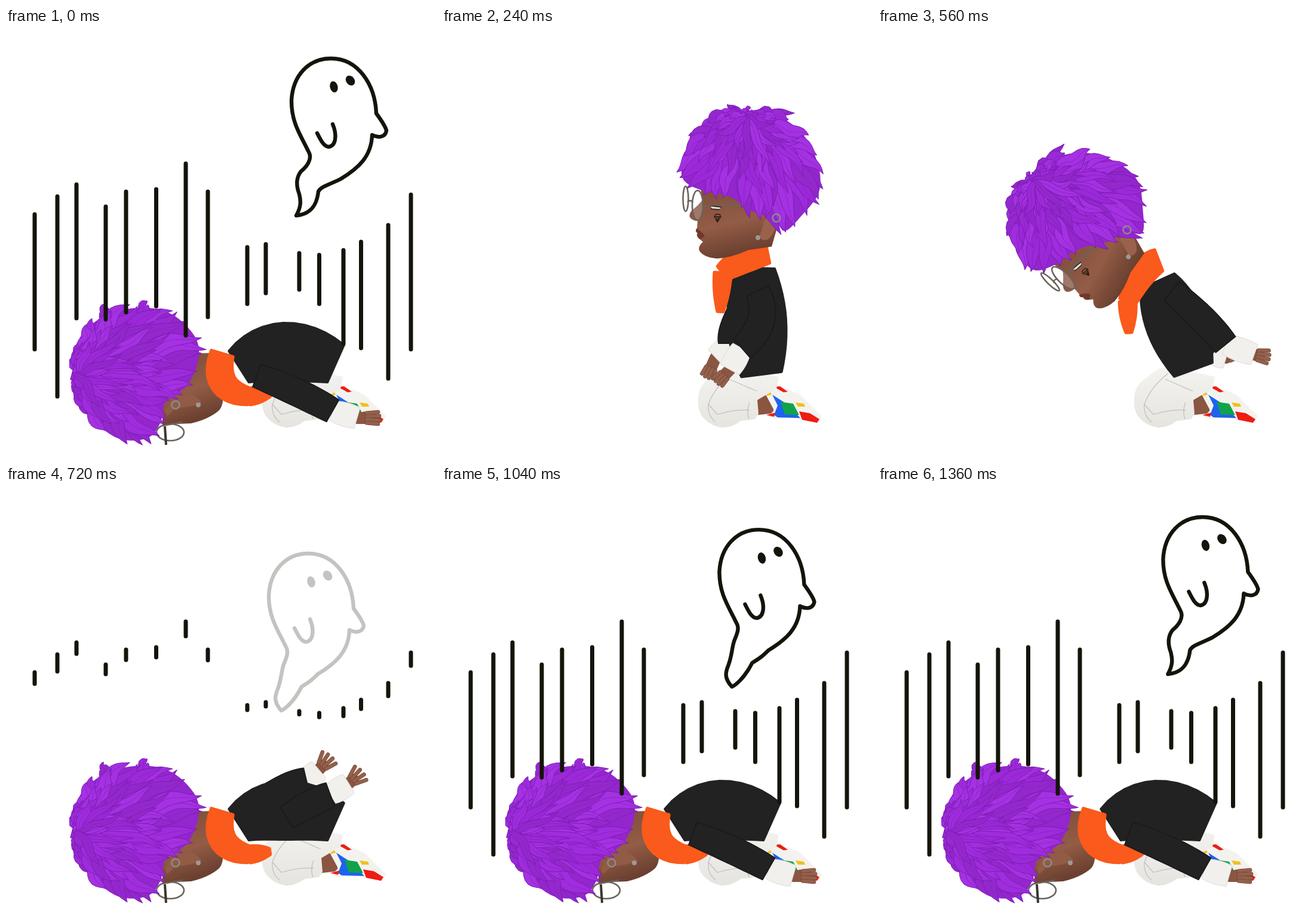
Animation, 720 px wide and 720 px high, one loop 1.44 s. Source, as an HTML page:

```html
<!DOCTYPE html>
<html lang="en">
<head>
<meta charset="utf-8">
<title>Falling to the floor</title>
<style>
html, body { margin: 0; width: 100%; height: 100%; overflow: hidden; background: #fff; }
svg { display: block; width: 100vw; height: 100vh; }
path { stroke-linejoin: round; }
.ink { fill: none; stroke: #15140a; stroke-linecap: round; }
.metal { fill: #fff3; stroke: #6a635c; stroke-width: 2.6; }
.wire { fill: none; stroke: #6a635c; stroke-width: 2.4; }
.thin { fill: none; stroke: #2b1712; stroke-width: 1.3; }
.seam { fill: none; stroke: #c3c1bb; stroke-width: 1.3; }
</style>
</head>
<body>
<svg viewBox="0 0 720 720">
  <defs>
    <linearGradient id="skin" x1="0" y1="0" x2=".3" y2="1">
      <stop offset="0" stop-color="#7c4c39"/><stop offset=".6" stop-color="#935c46"/><stop offset="1" stop-color="#6b4030"/>
    </linearGradient>
    <linearGradient id="pants" x1="0" y1="0" x2="0" y2="1">
      <stop offset="0" stop-color="#f4f3f0"/><stop offset="1" stop-color="#e6e4df"/>
    </linearGradient>
  </defs>

  <g id="legs">
    <path fill="#8a5541" d="M527 616 552 614 556 645 528 648Z"/>
    <path fill="#f3f2ef" d="M540 610 562 598 600 614 636 650 628 661 588 653 556 655 546 651 556 640Z"/>
    <path fill="#1d63ee" d="M553 614 578 630 600 653 562 652 556 648 562 632Z"/>
    <path fill="#11a34b" d="M567 626 588 629 598 648 574 647Z"/>
    <path fill="#ee1c12" d="M598 642 616 645 632 655 628 661 603 656ZM556 601 566 600 579 609 572 610ZM543 648 558 644 556 651Z"/>
    <path fill="#f2c018" d="M592 627 606 629 608 634 596 634ZM543 612 550 610 552 614 544 616Z"/>
    <path fill="url(#pants)" d="M430 612Q434 594 452 584 470 566 490 567L564 584 560 604 528 623 530 646 524 655 500 658Q484 670 468 669 446 665 434 648 426 634 430 612Z"/>
    <path class="seam" d="M486 578Q456 602 446 630L461 647Q492 638 515 640M481 588 527 608M446 630Q444 648 458 660M515 627Q509 642 514 655"/>
  </g>
  <g id="backArm"></g>
  <path id="torso" fill="#222" stroke="#222" stroke-width="4"/>
  <g id="lyingHead"></g>
  <path id="scarf" fill="#fa5a1b" stroke="#fa5a1b" stroke-width="5"/>
  <g id="sideHead"></g>
  <g id="frontArm"></g>
  <path id="bars" class="ink" stroke-width="7"/>
  <g id="ghost" class="ink" stroke-width="6.4">
    <path id="sheet"/>
    <path d="M521 176C527 188 532 198 540 199 552 198 555 180 547 161"/>
    <g fill="#15140a" stroke="none">
      <ellipse rx="6.500" ry="9.500" transform="translate(549 98.500) rotate(-15)"/>
      <ellipse rx="7" ry="9" transform="translate(576.500 88) rotate(-38)"/>
    </g>
  </g>
</svg>
<script>
const LOOP = 1440, STEP = 80;
const $ = id => document.getElementById(id);
const clamp = v => Math.max(0, Math.min(1, v));
const mix = (a, b, f) => Array.isArray(a) ? a.map((v, i) => mix(v, b[i], f)) : a + (b - a) * f;
const poly = pts => 'M' + pts.map(p => p.map(v => v.toFixed(1)).join(' ')).join('L') + 'Z';
const samples = (n, f) => Array.from({ length: n + 1 }, (_, i) => f(i / n));

function rng(seed) {
  return () => (seed = (seed * 16807) % 2147483647) / 2147483647;
}

// outline of a band with a given centre line and width
function ribbon(center, width) {
  const left = [], right = [];
  samples(12, u => {
    const [x, y] = center(u), a = center(u - .01), b = center(u + .01);
    const turn = Math.atan2(b[1] - a[1], b[0] - a[0]), r = width(u) / 2;
    const nx = -Math.sin(turn) * r, ny = Math.cos(turn) * r;
    left.push([x + nx, y + ny]);
    right.unshift([x - nx, y - ny]);
  });
  return poly([...left, ...right]);
}

// parabola through three values
const arc = (a, m, b, u) => a * (1 - u) * (1 - 2 * u) + m * 4 * u * (1 - u) + b * u * (2 * u - 1);
const tube = (a, m, b, widths) =>
  ribbon(u => [0, 1].map(k => arc(a[k], m[k], b[k], u)), u => arc(...widths, u));

// closed Catmull-Rom curve as a function of 0..1
function loop(pts) {
  const n = pts.length;
  return u => {
    const i = Math.floor(u * n), f = u * n - i;
    const [a, b, c, d] = [-1, 0, 1, 2].map(k => pts[(i + k + n) % n]);
    return [0, 1].map(k => b[k] + f / 2 * (c[k] - a[k] +
      f * (2 * a[k] - 5 * b[k] + 4 * c[k] - d[k] + f * (3 * (b[k] - c[k]) + d[k] - a[k]))));
  };
}

function lock(from, to, w, rand) {
  const dx = to[0] - from[0], dy = to[1] - from[1], len = Math.hypot(dx, dy) || 1;
  const bend = (rand() - .5) * len * .25, phase = rand() * 6;
  const side = u => bend * Math.sin(Math.PI * u) + 2.5 * Math.sin(u * 9 + phase);
  const center = u => [from[0] + dx * u - dy / len * side(u), from[1] + dy * u + dx / len * side(u)];
  const tone = ['#9b29d8', '#a431e2', '#9328cd', '#9f2cdd'][Math.floor(rand() * 4)];
  const strand = samples(12, center).map(p => p.map(v => v.toFixed(1)).join(' ')).join('L');
  return `<path d="${ribbon(center, u => w * Math.sin(Math.PI * (.15 + .85 * u)))}" fill="${tone}" stroke="#7d1db3"/>` +
    `<path d="M${strand}" fill="none" stroke="#8822c0" stroke-width=".8"/>`;
}

// layers of locks from the rim up to the crown; the outer tips break the outline
function hair(crown, rim, spikes, seed) {
  const rand = rng(seed), edge = loop(rim), count = 32;
  let out = `<path d="${poly(samples(80, edge))}" fill="#9326cc"/>`;
  for (const [from, to] of spikes) out += lock(from, to, 18, rand);
  for (const inner of [.5, .25, 0]) {
    for (let i = 0; i < count; i++) {
      const p = edge(((i * 7) % count + rand()) / count * .999);
      const far = Math.hypot(p[0] - crown[0], p[1] - crown[1]) || 1;
      const tip = inner === .5 ? 1 + (2 + rand() * 11) / Math.max(far, 60) : inner + .4 + rand() * .2;
      out += lock(mix(crown, p, inner), mix(crown, p, tip), 9 + inner * 24 + rand() * 5, rand);
    }
  }
  return out;
}

const skin = d => `<path fill="url(#skin)" d="${d}"/>`;
const lens = (x, y, rx, ry) => `<ellipse class="metal" cx="${x}" cy="${y}" rx="${rx}" ry="${ry}"/>`;
const jewels = (x, y, sx, sy) => `<circle cx="${x}" cy="${y}" r="6.500" fill="none" stroke="#8b8b88" stroke-width="2.600"/>` +
  `<circle cx="${sx}" cy="${sy}" r="4" fill="#9a9a96"/>`;

$('sideHead').innerHTML =
  skin('M432 262 436 288Q428 298 420 304 413 310 415 317 420 323 428 323L427 335Q423 339 428 343 424 347 432 354L437 358Q428 366 431 373 438 384 460 386 484 385 512 372L552 366 566 318 540 270Z') +
  '<path fill="#70392c" d="M426 336Q435 340 440 348 436 353 431 353 425 348 429 344 423 341 426 336Z"/>' +
  '<path fill="#9a624c" d="M540 322Q552 308 560 318 562 338 546 354 534 358 532 348Z"/>' +
  '<path fill="#ddd" d="M450 299 467 300 464 304 453 304Z"/><path class="thin" d="M446 297 468 300M450 303 465 304"/>' +
  lens(408, 286, 4.5, 21) + lens(428, 297, 9, 25) +
  '<path class="wire" d="M411 292Q415 286 420 292M437 299Q460 294 490 297L540 295"/>' +
  '<path class="thin" d="M456 316 458 312 465 312 467 316 461 325ZM456 316H467M460 316 461 325 464 316"/>' +
  hair([508, 148],
    [[505, 141], [560, 146], [606, 180], [630, 230], [631, 275], [604, 312], [574, 340], [556, 318],
      [522, 308], [480, 282], [435, 272], [403, 252], [406, 212], [424, 177], [458, 148]],
    [[[510, 152], [479, 126]], [[515, 150], [590, 140]]], 71) +
  jewels(560, 318, 529, 351);

$('lyingHead').innerHTML =
  lens(275, 677, 23, 14) +
  skin('M310 545 352 544 352 575 361 604Q367 628 357 640 340 655 310 662L262 664 262 630Z') +
  '<path fill="#915b45" d="M266 640 282 616 306 611Q322 618 328 628 306 636 284 636L270 650Z"/>' +
  '<path fill="none" stroke="#3c362f" stroke-width="4" d="M266 667 268 698"/><path class="wire" d="M262 666 296 660"/>' +
  hair([118, 578],
    [[119, 560], [124, 518], [155, 488], [200, 471], [250, 470], [288, 486], [319, 522], [321, 560],
      [302, 600], [268, 624], [258, 662], [236, 687], [190, 688], [150, 660], [126, 622]],
    [[[170, 490], [164, 462]], [[225, 478], [234, 456]]], 407) +
  jewels(284, 631, 322, 631);

// spine: neck, chest, hip; scarf: nape, bend, throat, tail tip
// arms: shoulder, elbow, wrist, cuff, palm; head: ear and tilt; fingers: spread and length
const upright = {
  spine: [[526, 402], [527, 490], [535, 580]],
  scarf: [[545, 375], [505, 388], [470, 410], [466, 475]],
  front: [[528, 440], [534, 490], [502, 536], [482, 572], [472, 582]],
  rear: [[500, 470], [488, 505], [484, 528], [458, 552], [450, 570]],
  head: [560, 318, 0], fingers: [.08, 17]
};
const leanBack = {
  spine: [[518, 408], [518, 490], [540, 582]],
  scarf: [[533, 387], [490, 392], [460, 412], [457, 482]],
  front: [[540, 445], [565, 480], [554, 518], [527, 562], [519, 573]],
  rear: [[505, 500], [496, 515], [488, 528], [472, 546], [464, 555]],
  head: [562, 337, 12.8], fingers: [.12, 17]
};
const bow = {
  spine: [[468, 424], [498, 494], [528, 572]],
  scarf: [[470, 389], [442, 412], [418, 458], [420, 510]],
  front: [[492, 440], [543, 487], [582, 530], [630, 547], [636, 548]],
  rear: [[500, 500], [540, 530], [560, 545], [583, 552], [586, 550]],
  head: [417, 338, -46], fingers: [.1, 20]
};
const flung = {
  spine: [[390, 567], [466, 543], [552, 562]],
  scarf: [[362, 545], [364, 594], [407, 617], [442, 612]],
  front: [[470, 555], [510, 532], [543, 517], [574, 498], [581, 492]],
  rear: [[430, 525], [472, 504], [503, 493], [524, 475], [530, 468]],
  head: [283, 632, -100], fingers: [.24, 21]
};
const limp = {
  ...flung,
  front: [[420, 582], [485, 609], [547, 641], [588, 653], [604, 653]],
  rear: [[430, 540], [470, 540], [500, 540], [515, 540], [520, 540]],
  fingers: [.06, 22]
};
const keys = [[80, upright], [240, upright], [400, leanBack], [560, bow], [720, flung], [1040, limp], [LOOP, limp]];

function poseAt(t) {
  const i = Math.max(1, keys.findIndex(k => k[0] >= t));
  const [t0, a] = keys[i - 1], [t1, b] = keys[i], out = {};
  for (const part in a) out[part] = mix(a[part], b[part], (t - t0) / (t1 - t0));
  return out;
}

function arm([shoulder, elbow, wrist, cuff, palm], [spread, len]) {
  const dir = Math.atan2(palm[1] - cuff[1], palm[0] - cuff[0]);
  let out = `<path d="M${cuff}L${palm}" stroke="#8a5641" stroke-width="20" stroke-linecap="round"/>`;
  for (let i = -1.5; i < 2; i++) {
    const a = dir + i * spread, r = len - Math.abs(i) * 2;
    const d = `M${palm[0] - Math.sin(dir) * i * 5.5} ${palm[1] + Math.cos(dir) * i * 5.5}l${Math.cos(a) * r} ${Math.sin(a) * r}`;
    out += `<path d="${d}" stroke="#6b4030" stroke-width="6.600" stroke-linecap="round"/>` +
      `<path d="${d}" stroke="#94604b" stroke-width="5.400" stroke-linecap="round"/>`;
  }
  return out + `<path d="${tube(wrist, mix(wrist, cuff, .5), cuff, [34, 40, 36])}" fill="#f1f0ed" stroke="#dddbd7"/>` +
    `<path d="${tube(shoulder, elbow, wrist, [40, 46, 42])}" fill="#222" stroke="#1b1b1b" stroke-width="2"/>`;
}

const bars = [[48, 312, 538], [86, 282, 617], [118, 262, 486], [167, 299, 488], [201, 274, 476], [251.5, 270, 466],
  [301, 227, 515], [338, 274, 484], [404, 367, 462], [435, 362, 444], [491, 377, 438], [524.5, 380, 462],
  [565, 372, 529], [594.5, 358, 536], [640, 330, 587], [678, 279, 538]];

// the tail below the waist drifts sideways
function sheetPath(swing) {
  const s = (x, y, k = 10) => `${x + k * swing} ${y} `;
  return 'M' + s(486, 314, 13) + 'C' + s(494, 300, -8) + s(494, 290, -6) + s(491, 278, 2) +
    s(485, 262, 14) + s(486, 250, 13) + s(494, 240, 8) +
    '504 232 512 220 508 210 494 180 478 160 478 122 480 78 508 51 544 51 590 51 618 95 620 143 ' +
    '628 154 636 166 637 172 635 184 622 184 613 179 612 215 590 235 560 253 ' +
    s(540, 263) + s(526, 266, 20) + s(523, 274) + s(520, 300, 0) + s(508, 312, -4) + s(486, 314, 13) + 'Z';
}

function draw(ms) {
  const t = Math.floor((ms % LOOP) / STEP) * STEP || LOOP;
  const { spine, scarf, front, rear, head: [x, y, tilt], fingers } = poseAt(t);
  const [nape, bend, throat, tail] = scarf;
  $('torso').setAttribute('d', tube(...spine, [62, 98, 68]));
  $('scarf').setAttribute('d', tube(nape, bend, throat, [38, 42, 28]) +
    tube(throat, mix(throat, tail, .5), tail, [28, 24, 10]));
  $('frontArm').innerHTML = arm(front, fingers);
  $('backArm').innerHTML = arm(rear, fingers);

  const lying = t >= 720;
  $('lyingHead').style.display = lying ? '' : 'none';
  $('sideHead').style.display = lying ? 'none' : '';
  $('sideHead').setAttribute('transform', `translate(${x} ${y}) rotate(${tilt}) translate(-560 -318)`);

  const g = clamp((t - 650) / 390), grow = g * g * (3 - 2 * g);
  $('bars').setAttribute('d', grow ? bars.map(([bx, top, end]) => `M${bx} ${top}V${mix(top, end, grow)}`).join('') : '');

  const drop = 1 - Math.sin(clamp((t - 720) / 720) * Math.PI / 2);
  $('ghost').setAttribute('transform', `translate(${-38 * drop} ${62 * drop})`);
  $('ghost').setAttribute('opacity', clamp((t - 640) / 320));
  $('sheet').setAttribute('d', sheetPath(clamp((1360 - t) / 320)));
}

const start = performance.now();
function tick() {
  draw(performance.now() - start);
  requestAnimationFrame(tick);
}
tick();
</script>
</body>
</html>
```
